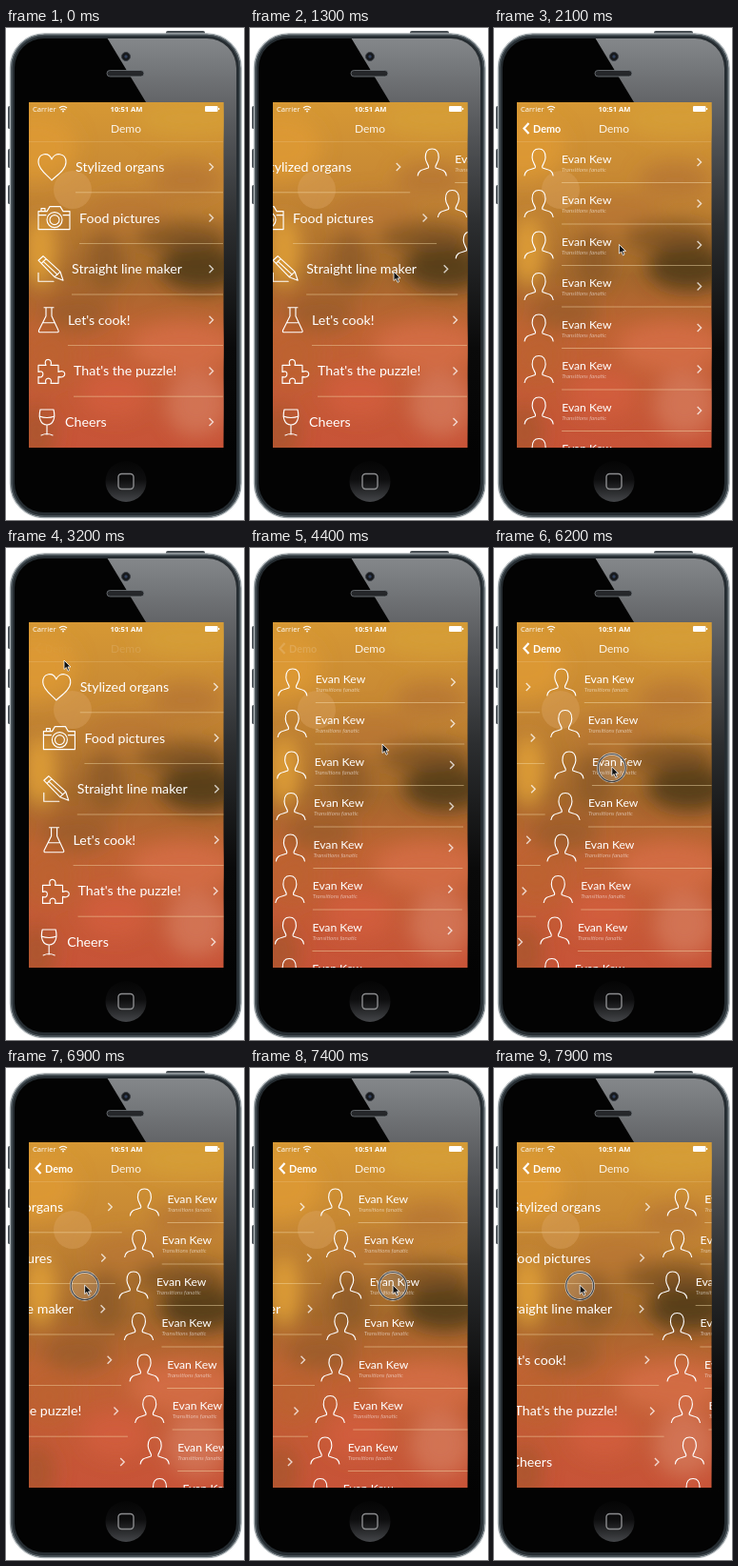
Animation of 250 by 517 pixels, one loop 8 s. Source, as an HTML page:

```html
<!DOCTYPE html>
<html lang="en">
<head>
<meta charset="utf-8">
<title>Wave transition</title>
<style>
  html, body { margin: 0; width: 100%; height: 100%; overflow: hidden; background: #fff; }
  svg { display: block; width: 250px; height: 517px; }
  text { font-family: Lato, "Open Sans", sans-serif; fill: #fff; }
  .menu { font-size: 14.2px; }
  .name { font-size: 12.2px; }
  .sub { font-size: 6.2px; font-style: italic; opacity: .55; }
  .status { font-size: 7.6px; font-family: "Open Sans", sans-serif; }
  .icon { fill: none; stroke: #fff; stroke-width: 1.15; stroke-linejoin: round; stroke-linecap: round; }
  .chev { fill: none; stroke: #fff; stroke-width: 1.4; opacity: .75; }
  .line { stroke: #f6dfae; stroke-width: .8; opacity: .6; }
</style>
</head>
<body>
<svg viewBox="0 0 250 517">
  <defs>
    <linearGradient id="gloss" x1="0" x2="0" y1="0" y2="1">
      <stop offset="0" stop-color="#85888b"/><stop offset=".2" stop-color="#595b5e"/>
      <stop offset=".45" stop-color="#2c2e30"/><stop offset=".75" stop-color="#0a0a0a"/>
      <stop offset="1" stop-color="#030303"/>
    </linearGradient>
    <linearGradient id="home" x1="0" x2="0" y1="0" y2="1">
      <stop offset="0" stop-color="#050505"/><stop offset=".45" stop-color="#0d0d0e"/>
      <stop offset="1" stop-color="#444649"/>
    </linearGradient>
    <linearGradient id="sky" x1="0" x2="0" y1="0" y2="1">
      <stop offset="0" stop-color="#d69834"/><stop offset=".25" stop-color="#c68734"/>
      <stop offset=".5" stop-color="#a4682c"/><stop offset=".66" stop-color="#c06434"/>
      <stop offset="1" stop-color="#c85338"/>
    </linearGradient>
    <filter id="blur" x="-60%" y="-60%" width="220%" height="220%"><feGaussianBlur stdDeviation="10"/></filter>
    <clipPath id="screen"><rect x="24" y="78" width="204.500" height="363"/></clipPath>
    <clipPath id="face"><rect x="9" y="11" width="233" height="498" rx="31"/></clipPath>
  </defs>

  <g fill="#474e53">
    <rect x="168" y="3" width="41" height="5" rx="2"/>
    <rect x="2" y="82" width="5" height="24" rx="1.500"/>
    <rect x="2" y="127" width="5" height="20" rx="1.500"/>
    <rect x="2" y="165" width="5" height="20" rx="1.500"/>
  </g>
  <rect x="4.500" y="6" width="242.500" height="508.500" rx="36" fill="#252c31" stroke="#a9b0b4" stroke-width="1.500"/>
  <rect x="6" y="7.500" width="239.500" height="505.500" rx="34.500" fill="none" stroke="#4d575d" stroke-width="1.400"/>
  <rect x="9" y="11" width="233" height="498" rx="31" fill="#030303"/>
  <path d="M106 10H246V445H226L147 78Z" fill="url(#gloss)" clip-path="url(#face)"/>
  <circle cx="126" cy="30" r="4.500" fill="#17191c" stroke="#3c4046"/>
  <circle cx="126" cy="30" r="1.700" fill="#31415c"/>
  <rect x="106" y="44.500" width="39" height="6.500" rx="3.250" fill="#25272a" stroke="#777b80" stroke-width=".8"/>
  <circle cx="126" cy="476.500" r="21.500" fill="url(#home)"/>
  <rect x="118" y="468.500" width="16" height="16" rx="3.500" fill="none" stroke="#8b8c8e" stroke-width="1.400"/>

  <g clip-path="url(#screen)">
    <rect x="24" y="78" width="205" height="363" fill="url(#sky)"/>
    <g id="blobs" filter="url(#blur)"></g>
    <circle cx="70" cy="170" r="20" fill="#dba565" opacity=".4"/>
    <path class="line" d="M24 119.500H228" style="opacity:.25"/>
    <g id="rows"></g>
    <text class="status" x="28" y="88">Carrier</text>
    <g fill="none" stroke="#fff" stroke-width="1.100">
      <path d="M56 84q4-3.500 8 0M57.500 86q2.500-2 5 0"/><circle cx="60" cy="87.500" r=".4"/>
    </g>
    <text class="status" x="126.500" y="88" text-anchor="middle" font-weight="700">10:51 AM</text>
    <rect x="209" y="82" width="13.500" height="6" rx="1" fill="#fff"/>
    <rect x="223" y="84" width="1.200" height="2" fill="#fff"/>
    <text id="title" x="126" y="109.500" text-anchor="middle" font-size="12">Demo</text>
    <g id="back">
      <path d="M36.500 100L31.500 105.500L36.500 111" fill="none" stroke="#fff" stroke-width="2.200"/>
      <text x="41" y="109.500" font-size="10.800" font-weight="700">Demo</text>
    </g>
  </g>
  <g id="cursor">
    <g id="touch" fill="none">
      <circle r="14.500" fill="#fff" fill-opacity=".14" stroke="#d8d8d8" stroke-width="2.400"/>
      <circle r="14.500" stroke="#444" stroke-width="1.200"/>
    </g>
    <path d="M0-1V8.500L2.300 6.500L4 10.300L5.600 9.500L4 5.900H7Z" fill="#111" stroke="#fff" stroke-width=".8"/>
  </g>
</svg>
<script>
const LOOP = 8000, WIDTH = 204, PAN = 5900, TOUCH_Y = 229;
const $ = id => document.getElementById(id);

// x, y, rx, ry, colour, opacity
const blobs = [
  [30, 125, 45, 35, '#df9a32', .8], [195, 95, 60, 20, '#d6a03a', .7],
  [36, 235, 18, 38, '#e0a038', .9], [130, 195, 45, 22, '#b87534', .7],
  [190, 160, 38, 18, '#b27236', .7], [185, 220, 50, 16, '#7a5020', .8],
  [205, 252, 44, 24, '#513b1a', .9], [105, 245, 20, 32, '#8b5828', .8],
  [75, 300, 36, 20, '#8f592a', .6], [185, 335, 55, 26, '#d66f49', .8],
  [45, 345, 30, 30, '#bb632e', .7], [115, 385, 35, 25, '#d65f40', .7],
  [200, 395, 32, 34, '#d57a5c', .8], [32, 425, 20, 30, '#a8572d', .8]
];
$('blobs').innerHTML = blobs.map(([x, y, rx, ry, c, o]) =>
  `<ellipse cx="${x}" cy="${y}" rx="${rx}" ry="${ry}" fill="${c}" opacity="${o}"/>`).join('');

// label, text x, icon path
const menu = [
  ['Stylized organs', 73, 'M48 14C44 9 34 3 34-5C34-15 45-16 48-8C51-16 63-15 63-5C63 3 53 9 48 14Z'],
  ['Food pictures', 77, 'M34-7H43L46-12H57L60-7H67V12H34ZM37-7V-10H41V-7M34-3H42M60-3H67M43 2a8 8 0 1 0 16 0a8 8 0 1 0-16 0M46 2a5 5 0 1 0 10 0a5 5 0 1 0-10 0'],
  ['Straight line maker', 69, 'M34-9L39-13.500L57 3L60 12L51 8.500ZM37.500-6L42-10.500M51 8.500L57 3M39-8L54 6M34 4V13H50'],
  ["Let's cook!", 65, 'M40-13H50M42-13V-4L34.500 11Q34 13 36 13H53Q56 13 55 11L48-4V-13M39 3H51'],
  ["That's the puzzle!", 71, 'M34-6H42C38-14 50-14 47-6H55V1C64-3 64 9 55 6V13H47C50 6 39 6 42 13H34V6C40 9 41-2 34 1Z'],
  ['Cheers', 62, 'M36-13H50C52-5 50 3 43 3S34-5 36-13ZM35-6Q43-3 51-6M43 3V13M37 14Q43 11 49 14']
];
const person = 'M32 14C33 7 39 8 43 6C45 4 40 1 40-5C40-11 43-14 47-14S54-11 54-5C54 1 49 4 51 6C55 8 61 7 62 14';

const rows = [];
const chevron = y => `<path class="chev" d="M213.500 ${y - 4}L217.500 ${y}L213.500 ${y + 4}"/>`;
const rule = (x, y) => `<path class="line" d="M${x} ${y}H228"/>`;
function addRow(html, y, delay, base) {
  const el = document.createElementNS('http://www.w3.org/2000/svg', 'g');
  el.innerHTML = html;
  $('rows').append(el);
  rows.push({ el, y, delay, base });
}
menu.forEach(([label, x, icon], i) => {
  const y = 146 + 53.6 * i;
  addRow(`<path class="icon" transform="translate(0 ${y})" d="${icon}"/>
    <text class="menu" x="${x}" y="${y + 5}">${label}</text>
    ${chevron(y)}${i < 5 ? rule(x, y + 26.8) : ''}`, y, 25 * i, 0);
});
for (let i = 0; i < 8; i++) {
  const y = 141 + 43.5 * i;
  addRow(`<path class="icon" transform="translate(0 ${y})" d="${person}"/>
    <text class="name" x="71" y="${y + .5}">Evan Kew</text>
    <text class="sub" x="71" y="${y + 9.5}">Transitions fanatic</text>
    ${chevron(y)}${rule(71, y + 21.5)}`, y, 18.75 * i, WIDTH);
}

function spring(ms) {
  if (ms <= 0) return 0;
  const w = 13, z = .75, s = ms / 1000, d = Math.sqrt(1 - z * z), a = w * d * s;
  return 1 - Math.exp(-z * w * s) * (Math.cos(a) + z / d * Math.sin(a));
}
const clamp = v => Math.max(0, Math.min(1, v));
const ramp = (t, a, b) => clamp((t - a) / (b - a));

// Cosine easing through [time, value] points
function path(points, t) {
  if (t <= points[0][0]) return points[0][1];
  for (let i = 1; i < points.length; i++) {
    const [t0, v0] = points[i - 1], [t1, v1] = points[i];
    if (t <= t1) return v0 + (v1 - v0) * (1 - Math.cos(Math.PI * (t - t0) / (t1 - t0))) / 2;
  }
  return points[points.length - 1][1];
}

// The rows swing about 150 ms behind the finger; rows far from it lag further
const LAG = .3;
const pan = [[6020, 0], [6633, 160], [7200, 0], [7733, 176], [8300, 0]];
const cursorX = [[300, 200], [1000, 151], [1900, 151], [2600, 48], [2850, 48], [3200, 61], [3750, 139],
  [4700, 139], [5600, 45], [5870, 45], [6483, 185], [7050, 63], [7580, 180], [8150, 30]];
const cursorY = [[300, 530], [1000, 257], [1900, 257], [2600, 107], [2850, 107], [3200, 119], [3750, 207],
  [4700, 207], [5600, 230], [6200, 231], [6900, 229]];
const push1 = 1225, pop = 2780, push2 = 3900;
const taps = [push1, pop, push2];

function shift(t, row) {
  if (t >= PAN) return path(pan, t - LAG * Math.abs(row.y - TOUCH_Y)) - WIDTH;
  if (t >= push2) return -WIDTH * spring(t - push2 - row.delay);
  if (t >= pop) return -WIDTH * (1 - spring(t - pop - row.delay));
  return -WIDTH * spring(t - push1 - row.delay);
}

const dip = (t, a, b, c, d) => 1 - ramp(t, a, b) * (1 - ramp(t, c, d));

function draw(t) {
  for (const row of rows) {
    const x = row.base + shift(t, row);
    row.el.setAttribute('transform', `translate(${x.toFixed(2)} 0)`);
  }
  const title = dip(t, push1 + 100, push1 + 250, push1 + 250, push1 + 500)
    * dip(t, pop, pop + 300, pop + 380, pop + 680)
    * dip(t, push2 + 100, push2 + 250, push2 + 250, push2 + 500);
  $('title').setAttribute('opacity', title * .9);
  const back = t < pop ? ramp(t, push1 + 450, push1 + 780)
    : t < push2 ? 1 - ramp(t, pop, pop + 430)
    : ramp(t, push2 + 450, push2 + 780);
  $('back').setAttribute('opacity', back);
  $('cursor').setAttribute('transform', `translate(${path(cursorX, t)} ${path(cursorY, t)})`);
  const held = t >= PAN - 50 || taps.some(s => t > s - 100 && t < s);
  $('touch').setAttribute('opacity', held ? 1 : 0);
}

const start = performance.now();
function tick() {
  draw((performance.now() - start) % LOOP);
  requestAnimationFrame(tick);
}
draw(0);
requestAnimationFrame(tick);
</script>
</body>
</html>
```
